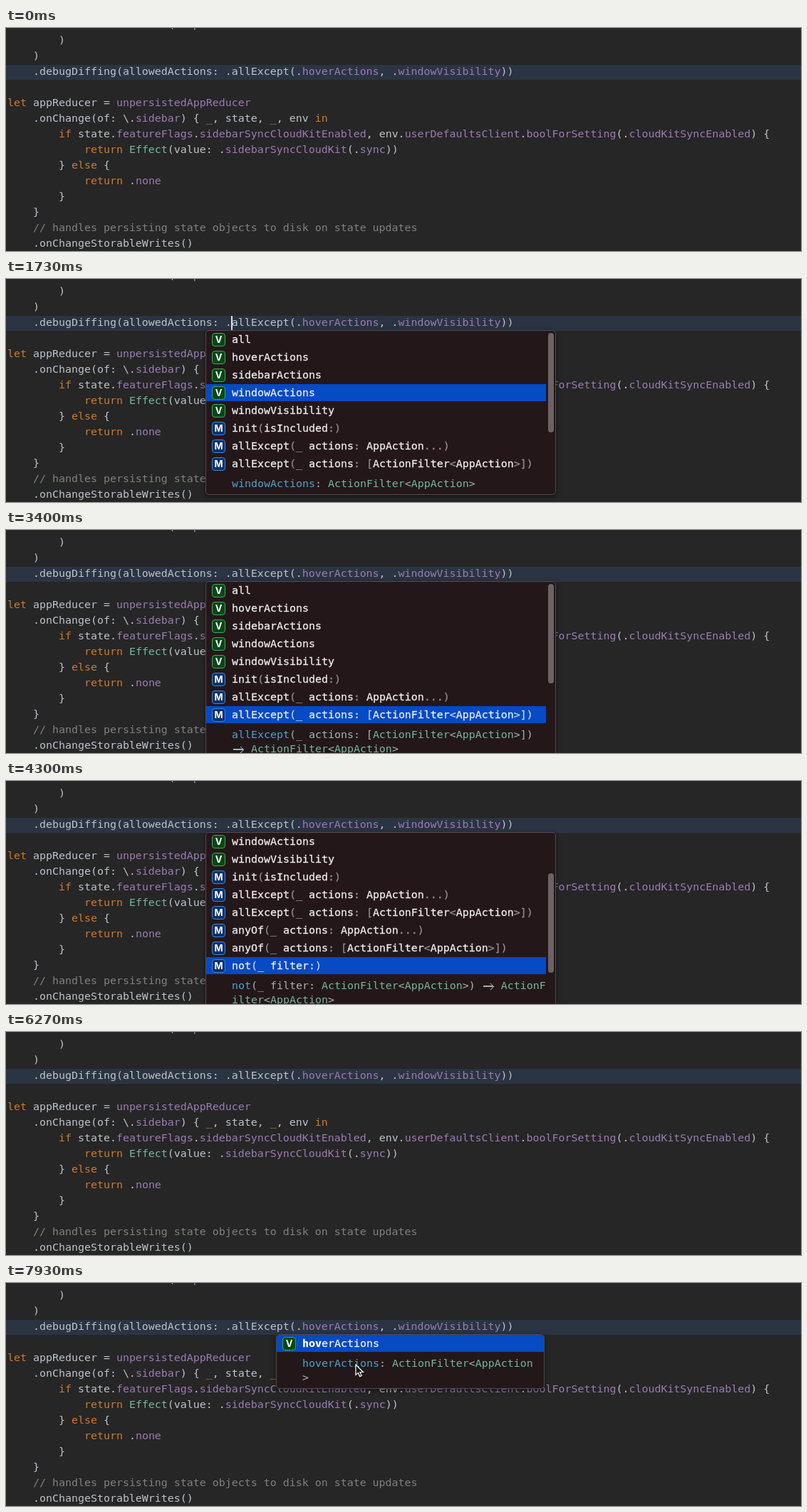
An HTML page that plays this animation: 1116 px wide and 314 px high, repeating every 8000 ms.

```html
<!DOCTYPE html>
<html lang="en">
<head>
<meta charset="utf-8">
<title>Code completion</title>
<style>
  html, body { margin: 0; width: 100%; height: 100%; overflow: hidden; background: #262626; }
  body { position: relative; font: 14.95px/22px "DejaVu Sans Mono", monospace; color: #bdc3cb; font-variant-ligatures: none; }
  body > * { position: absolute; box-sizing: border-box; }
  pre { margin: 0; left: 2px; top: -16px; font: inherit; }
  .current-line { left: 0; top: 52px; width: 100%; height: 21px; background: #2b3442; }
  .keyword { color: #cf7a2b; }
  .member { color: #9b7bb5; }
  .type { color: #72b8a0; }
  .comment { color: #808080; }
  #caret { top: 52px; width: 2px; height: 21px; background: #dfe3e8; }

  .popup { top: 72px; border: 1px solid #504b4d; border-radius: 5px; background: #24171a; overflow: hidden; box-shadow: 0 2px 6px #0008; }
  #members { left: 280px; width: 492px; }
  #match { left: 379px; width: 377px; }
  .view { height: 200px; overflow: hidden; }
  .row { position: relative; box-sizing: border-box; height: 25px; padding-left: 36px; border-bottom: 1px solid transparent;
    background-clip: padding-box; line-height: 25px; white-space: pre; color: #ececec; -webkit-text-stroke: 0.3px; }
  #members .row { width: 477px; }
  .row i { color: #8f8a8b; font-style: normal; }
  .selected { background-color: #064ac4; }
  .selected i { color: #c3cfe6; }
  .row b { color: #fff; }
  .icon { position: absolute; left: 8px; top: 3px; width: 19px; height: 19px; box-sizing: border-box; border: 1px solid; border-radius: 4px;
    color: #fff; font: bold 13px/17px Inter, sans-serif; text-align: center; -webkit-text-stroke: 0; }
  .V { background: #064717; border-color: #46a354; }
  .M { background: #07316f; border-color: #4584cf; }
  .doc { padding: 5px 12px 5px 36px; line-height: 20px; white-space: pre-wrap; line-break: anywhere; color: #a2b5b0; }
  .doc .name { color: #4aa5c6; }
  .doc .bool { color: #c9bbe0; }
  .arrow { position: relative; color: transparent; white-space: nowrap; }
  .arrow::before, .arrow::after { content: ""; position: absolute; box-sizing: border-box; }
  .arrow::before { left: 2px; top: 9px; width: 14px; height: 1.5px; background: #a2b5b0; }
  .arrow::after { left: 9px; top: 6.5px; width: 6.5px; height: 6.5px; border: solid #a2b5b0; border-width: 1.5px 1.5px 0 0; transform: rotate(45deg); }
  #thumb { position: absolute; left: 480px; top: 3px; width: 8px; height: 140px; border-radius: 4px; background: #6c6264; }
  #mouse { left: 0; top: 0; width: 24px; height: 24px; overflow: visible; }
</style>
</head>
<body>
<div class="current-line"></div>
<pre id="code">
            environment: \.unpersistEnvironment
        )
    )
    .debugDiffing(allowedActions: .allExcept(.hoverActions, .windowVisibility))

let appReducer = unpersistedAppReducer
    .onChange(of: \.sidebar) { _, state, _, env in
        if state.featureFlags.sidebarSyncCloudKitEnabled, env.userDefaultsClient.boolForSetting(.cloudKitSyncEnabled) {
            return Effect(value: .sidebarSyncCloudKit(.sync))
        } else {
            return .none
        }
    }
    // handles persisting state objects to disk on state updates
    .onChangeStorableWrites()</pre>
<div id="caret"></div>
<div id="members" class="popup">
  <div class="view"><div id="rows"></div></div>
  <div class="doc"></div>
  <div id="thumb"></div>
</div>
<div id="match" class="popup">
  <div class="row selected"><span class="icon V">V</span><b>hov</b>erActions</div>
  <div class="doc"></div>
</div>
<svg id="mouse">
  <defs><path id="beamShape" d="M-3-8Q0-8 0-5Q0-8 3-8M0-5V5M-3 8Q0 8 0 5Q0 8 3 8M-2 3H2"/></defs>
  <g id="beam" fill="none" stroke-linecap="round">
    <use href="#beamShape" stroke="#111" stroke-width="3.2"/>
    <use href="#beamShape" stroke="#fff" stroke-width="1.4"/>
  </g>
  <path id="pointer" d="M0 0V14.5L3.4 11.4L5.7 16.6L8.2 15.5L5.9 10.5H10.4Z" fill="#111" stroke="#fff" stroke-width="1.2"/>
</svg>
<script>
const LOOP = 8000;
const RESULT = "ActionFilter<AppAction>";
const labels = [
  "all", "hoverActions", "sidebarActions", "windowActions", "windowVisibility",
  "init(isIncluded:)",
  "allExcept(_ actions: AppAction...)", `allExcept(_ actions: [${RESULT}])`,
  "anyOf(_ actions: AppAction...)", `anyOf(_ actions: [${RESULT}])`,
  "not(_ filter:)",
];
const VISIBLE_ROWS = 8;

// Times in ms
const OPEN = 400, CLOSE = 5900, FIRST_CLICK = 6600, SECOND_CLICK = 7100, MATCH_OPEN = 7350;
const downs = [900, 1250, 1600, 2150, 2600, 3000, 3300, 3600, 3850, 4100];
const ups = [4550, 4750, 4950, 5150];
const mousePath = [[6600, 417, 64], [6900, 442, 65], [7400, 442, 65], [7800, 491, 115]];

const $ = id => document.getElementById(id);
const escapeHtml = text => text.replace(/</g, "&lt;");
const show = (element, visible) => element.style.display = visible ? "" : "none";
const countBefore = (times, t) => times.filter(time => time <= t).length;

// Wraps each match in a span whose class is the name of the group that matched
function paint(text, pattern) {
  return escapeHtml(text).replace(pattern, (token, ...rest) => {
    const groups = rest.at(-1);
    const name = Object.keys(groups).find(key => groups[key] !== undefined);
    return `<span class="${name}">${token}</span>`;
  });
}

const codePattern = /(?<comment>\/\/.*)|(?<keyword>\b(?:let|in|if|return|else|_)\b)|(?<type>\bEffect\b)|(?<member>(?<=\.)(?!debug|all|onCh)\w+|\bunpersisted\w+)/g;
const docPattern = /(?<name>^\w+)|(?<arrow>->)|(?<bool>\bBool\b)|(?<type>\b[A-Z]\w+)/g;

function describe(label) {
  if (!label.includes("(")) return `${label}: ${RESULT}`;
  const parameter = label.startsWith("init") ? "(AppAction) -> Bool" : RESULT;
  return `${label.replace(":)", `: ${parameter})`)} -> ${RESULT}`;
}

function rowHtml(label) {
  const kind = label.includes("(") ? "M" : "V";
  const text = escapeHtml(label).replace(/&lt;|[^\w ]|_/g, "<i>$&</i>");
  return `<div class="row"><span class="icon ${kind}">${kind}</span>${text}</div>`;
}

function mouseAt(t) {
  const next = mousePath.findIndex(([time]) => time > t);
  if (next < 0) return mousePath.at(-1).slice(1);
  const [t0, x0, y0] = mousePath[Math.max(next - 1, 0)];
  const [t1, x1, y1] = mousePath[next];
  const p = Math.max(0, (t - t0) / (t1 - t0 || 1));
  const eased = p * p * (3 - 2 * p);
  return [x0 + (x1 - x0) * eased, y0 + (y1 - y0) * eased];
}

$("code").innerHTML = paint($("code").textContent, codePattern);
$("rows").innerHTML = labels.map(rowHtml).join("");
const rows = [...$("rows").children];
const memberDoc = $("members").querySelector(".doc");
$("match").querySelector(".doc").innerHTML = paint(describe("hoverActions"), docPattern);

let selected = -1;
function select(index) {
  if (index === selected) return;
  rows.forEach((row, i) => row.classList.toggle("selected", i === index));
  memberDoc.innerHTML = paint(describe(labels[index]), docPattern);
  selected = index;
}

function draw(t) {
  const lowest = countBefore(downs, t);
  const scroll = Math.max(0, lowest - VISIBLE_ROWS + 1);
  select(lowest - countBefore(ups, t));
  show($("members"), t >= OPEN && t < CLOSE);
  show($("match"), t >= MATCH_OPEN);
  $("rows").style.transform = `translateY(${-25 * scroll}px)`;
  $("thumb").style.transform = `translateY(${18 * scroll}px)`;

  const click = t >= SECOND_CLICK ? SECOND_CLICK : t >= FIRST_CLICK ? FIRST_CLICK : -500;
  $("caret").style.left = (t >= SECOND_CLICK ? 442 : t >= FIRST_CLICK ? 415 : 316) + "px";
  show($("caret"), (t - click) % 1000 < 500);

  const [x, y] = mouseAt(t);
  const overPopup = t >= MATCH_OPEN && y > 72;
  show($("mouse"), t >= FIRST_CLICK);
  show($("beam"), !overPopup);
  show($("pointer"), overPopup);
  $("mouse").style.transform = `translate(${x}px, ${y}px)`;
}

function frame() {
  draw(performance.now() % LOOP);
  requestAnimationFrame(frame);
}
frame();
</script>
</body>
</html>
```
